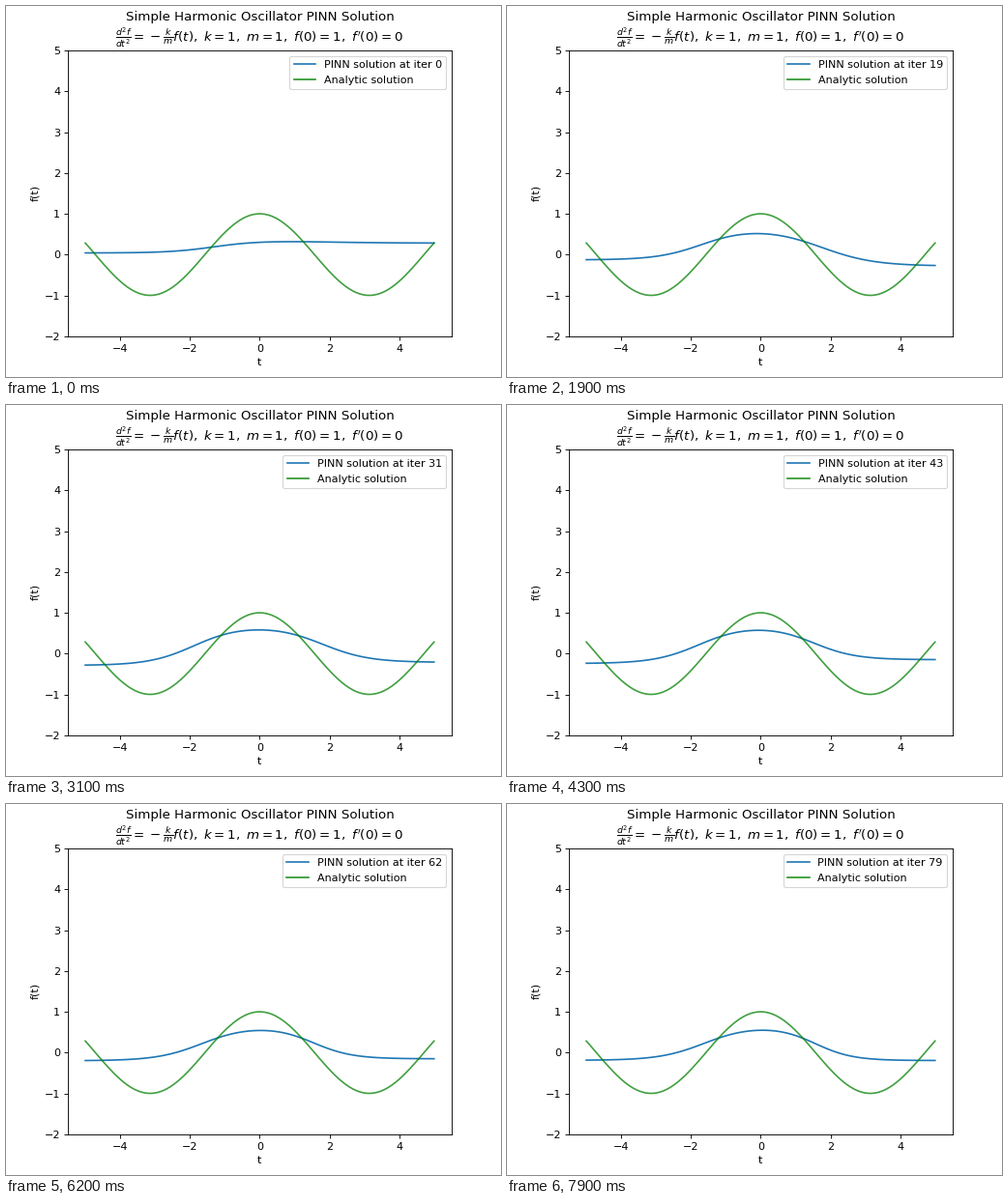
A matplotlib script for the animation above (8000 ms loop, 512x384 px).

```python
import numpy as np
import matplotlib.pyplot as plt
from matplotlib.animation import FuncAnimation

FRAMES = 80
INTERVAL = 100

t = np.linspace(-5, 5, 100)


def track(it, *points):
    """Value at iteration it along (iteration, value) key points."""
    return np.interp(it, *zip(*points))


def step(center, width):
    return (1 + np.tanh((t - center) / width)) / 2


def solution(it):
    """Two tanh steps: up from the left tail, down to the right one."""
    left = track(it, (0, .04), (19, -.13), (31, -.29), (53, -.205), (79, -.19))
    top = track(it, (0, .35), (19, .66), (31, .69), (53, .70), (71, .61), (79, .66))
    right = track(it, (0, .28), (9, -.1), (19, -.28), (43, -.15), (53, -.13), (79, -.195))
    rise = track(it, (0, -1.3), (19, -1.66), (31, -1.87), (53, -1.66), (79, -1.6))
    fall = track(it, (0, 1.6), (31, 1.79), (43, 1.5), (79, 1.55))
    fall_width = 1.05 + 1.1 * np.exp(-it / 23)
    up = (top - left) * step(rise, 1.3)
    down = (top - right) * step(fall, fall_width)
    return left + up - down


fig, ax = plt.subplots(figsize=(6.4, 4.8), dpi=80)
pinn, = ax.plot(t, solution(0), label="PINN solution at iter 0")
ax.plot(t, np.cos(t), label="Analytic solution", color="green", alpha=0.75)
ax.set(xlim=(-5.5, 5.5), ylim=(-2, 5), xlabel="t", ylabel="f(t)")
ax.set_title(
    "Simple Harmonic Oscillator PINN Solution\n"
    r"$\frac{d^2f}{dt^2}=-\frac{k}{m}f(t),~k=1,~m=1,~f(0)=1,~f'(0)=0$"
)
legend = ax.legend(loc="upper right")
legend.get_lines()[1].set_alpha(0.85)
label = legend.get_texts()[0]


def update(it):
    pinn.set_ydata(solution(it))
    label.set_text(f"PINN solution at iter {it}")
    return pinn, label


anim = FuncAnimation(fig, update, frames=FRAMES, interval=INTERVAL,
                     repeat=True, repeat_delay=0, blit=False)
plt.show()
```
